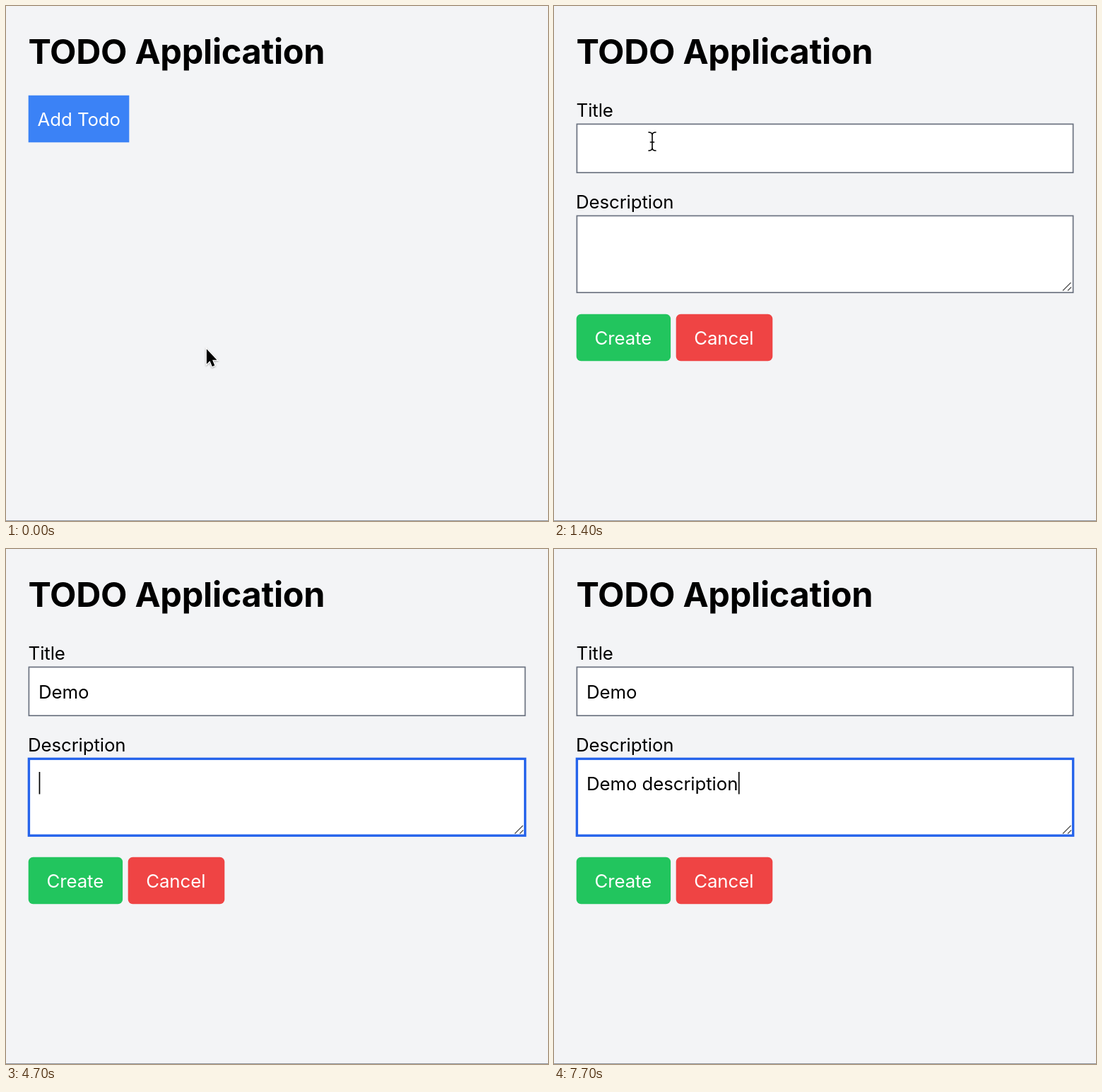
These frames come from a looping animation (767x730 px, 8 s). An HTML page:

```html
<!DOCTYPE html>
<html lang="en">
<head>
<meta charset="utf-8">
<title>TODO Application</title>
<style>
  html, body { margin: 0; width: 100%; height: 100%; overflow: hidden; background: #f3f4f6; }
  svg { display: block; width: 767px; height: 730px; }
  text { font: 420 25.8px Inter, "Liberation Sans", sans-serif; letter-spacing: -.08px; white-space: pre; }
  .heading { font-weight: 700; font-size: 48.6px; letter-spacing: -.3px; }
  .on { fill: #fff; }
  .field { fill: #fff; stroke: #6b7280; stroke-width: 1.7; }
  .field.focus { stroke: #2563eb; stroke-width: 3.4; }
  .grip { fill: none; stroke: #555; stroke-width: 1.3; }
  .cursor { filter: drop-shadow(0 1.5px 1.2px #0005); }
  .line { fill: none; stroke: #000; stroke-width: 1.6; stroke-linecap: round; stroke-linejoin: round; }
</style>
</head>
<body>
<svg viewBox="0 0 767 730">
  <rect y="729" width="767" height="1" fill="#8f949c"/>
  <text class="heading" x="31.5" y="82">TODO Application</text>

  <g id="home">
    <rect x="31.7" y="126.7" width="142.6" height="66.6" fill="#3b82f6"/>
    <text class="on" x="44.6" y="170">Add Todo</text>
  </g>

  <g id="form">
    <text x="31.6" y="156.5">Title</text>
    <rect id="titleBox" class="field" x="32.4" y="167.4" width="702.2" height="68.8"/>
    <text id="title" x="46" y="211.5"></text>
    <text x="31" y="286.5">Description</text>
    <rect id="noteBox" class="field" x="32.4" y="297.4" width="702.2" height="108.8"/>
    <path class="grip" d="M720 403.5L731.5 392M727 403.5L732 398.5"/>
    <text id="note" x="46" y="341.5"></text>
    <rect x="31.7" y="436.7" width="133.4" height="66.6" rx="6.6" fill="#22c55e"/>
    <text class="on" x="57.5" y="480">Create</text>
    <rect x="172.7" y="436.7" width="136.6" height="66.6" rx="6.6" fill="#ef4444"/>
    <text class="on" x="198.2" y="480">Cancel</text>
    <rect id="caret" width="1.7" height="31.5"/>
  </g>

  <g id="arrow" class="cursor">
    <path d="M.4 .8V22L5 17.6L8.3 25.4L11.8 23.9L8.6 16.3H15Z" stroke="#fff" stroke-width="2.4" paint-order="stroke"/>
  </g>
  <g id="hand" class="cursor">
    <path class="line" style="fill:#fff" d="M-2.5 16.6C-3.7 14.5-5.1 12.8-6.6 11.2C-7.9 9.4-5.5 7.6-3.6 9.2L-1.1 11.4L-3.4 4.6C-4.4 1.6-.6.5 .6 3.4L2.9 10C2.7 7.6 6.3 7.2 6.9 10C7.3 8 10.5 8.2 10.9 10.8C11.7 9.4 14.9 9.8 15.3 12.4C15.9 16 16.3 18.4 14.1 22L13.9 26H2.1C1.1 22.4-1.1 19.8-2.5 16.6Z"/>
    <path class="line" style="stroke-width:1.3" d="M4.2 15.5V21.5M7.8 15.5V21.5M11.4 15.5V21.5"/>
  </g>
  <g id="beam">
    <path class="line" d="M-5-13Q0-13 0-9Q0-13 5-13M0-9V9M-5 13Q0 13 0 9Q0 13 5 13M-2.6 1H2.6"/>
  </g>
</svg>
<script>
  const LOOP = 8000, STEP = 100;
  const $ = id => document.getElementById(id);
  const show = (id, on) => { $(id).style.display = on ? '' : 'none'; };

  const fields = [
    { id: 'title', value: 'Demo', from: 2000, to: 3700, top: 186,
      keys: [3000, 3200, 3300, 3400] },
    { id: 'note', value: 'Demo description', from: 3700, to: LOOP, top: 316,
      keys: [4900, 5100, 5200, 5300, 5500, 6400, 6500, 6700, 6900, 7000,
             7200, 7300, 7400, 7500, 7600, 7700] }
  ];

  // Pointer stops: time, x, y
  const path = [[0, 283.5, 485.5], [600, 130, 178], [900, 130, 178], [1100, 139, 192]];

  function pointer(t) {
    const i = path.findIndex(p => p[0] > t);
    if (i < 0) return path[path.length - 1].slice(1);
    const [t0, x0, y0] = path[i - 1], [t1, x1, y1] = path[i];
    const u = (t - t0) / (t1 - t0), e = u * u * (3 - 2 * u);
    return [x0 + (x1 - x0) * e, y0 + (y1 - y0) * e];
  }

  function drawField({ id, value, from, to, top, keys }, t) {
    const typed = keys.filter(k => k <= t);
    const focus = t >= from && t < to;
    const el = $(id);
    el.textContent = value.slice(0, typed.length);
    $(id + 'Box').classList.toggle('focus', focus);
    if (!focus) return;
    const last = typed.length ? typed[typed.length - 1] : from;
    const width = typed.length ? el.getComputedTextLength() : 0;
    $('caret').setAttribute('x', 46.6 + width);
    $('caret').setAttribute('y', top);
    show('caret', (t - last) % 1000 < 500);
  }

  function draw(now) {
    const t = Math.floor(now % LOOP / STEP) * STEP;
    const open = t >= 1400;
    show('home', !open);
    show('form', open);
    show('caret', false);
    fields.forEach(f => drawField(f, t));

    const [x, y] = pointer(t);
    const over = y < 193;
    const kind = t >= 3000 ? '' : open ? 'beam' : over ? 'hand' : 'arrow';
    for (const id of ['arrow', 'hand', 'beam']) {
      show(id, id === kind);
      $(id).setAttribute('transform', `translate(${x} ${y})`);
    }
  }

  const start = performance.now();
  function tick() {
    draw(performance.now() - start);
    requestAnimationFrame(tick);
  }
  tick();
</script>
</body>
</html>
```
